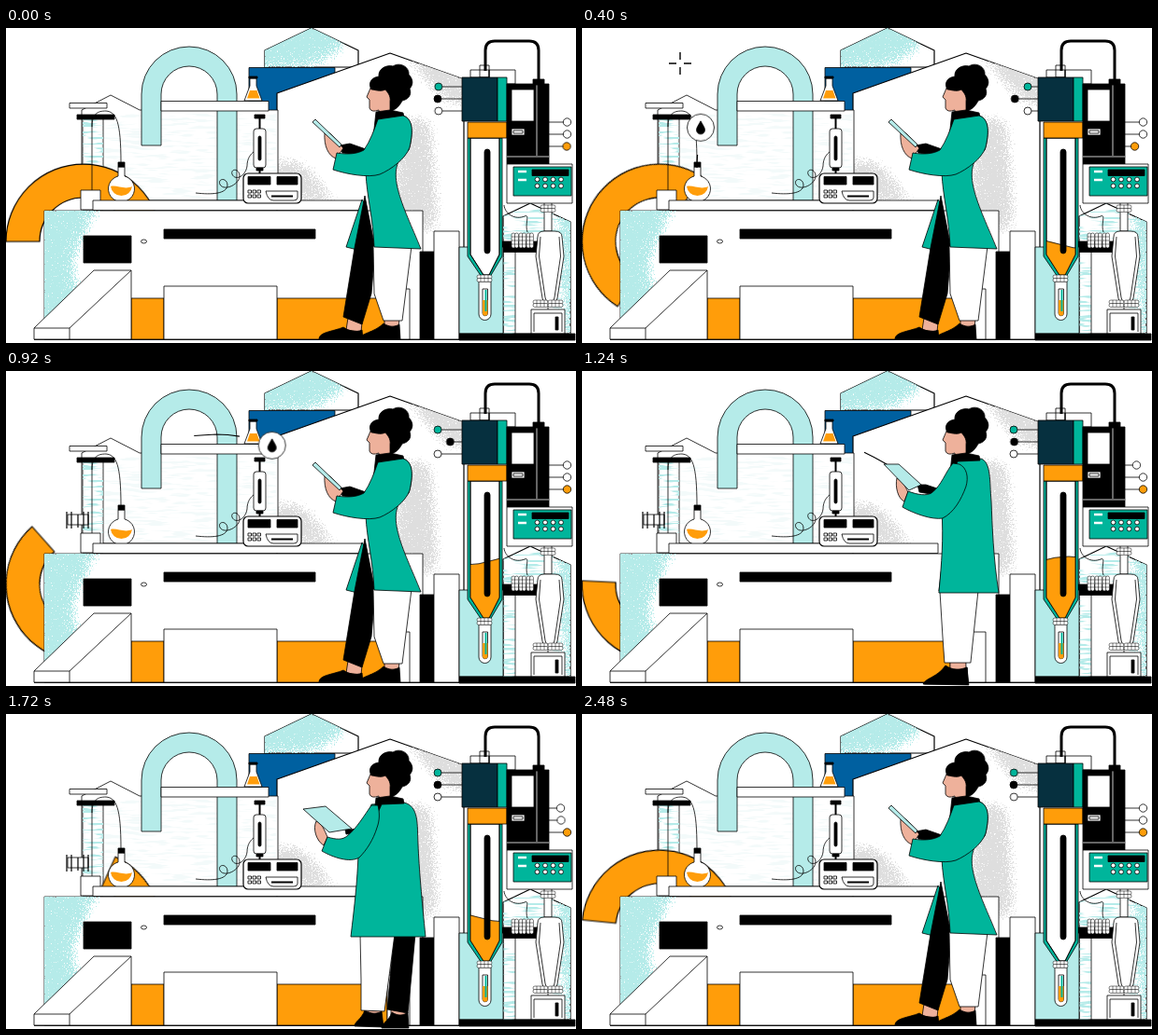
These frames come from a looping animation (610x338 px, 2520 ms). An HTML page without scripts:

```html
<!DOCTYPE html>
<html lang="en">
<head>
<meta charset="utf-8">
<title>Laboratory</title>
<style>
html, body { margin: 0; width: 100%; height: 100%; overflow: hidden; background: #fff; }
svg { display: block; }
#stage { fill: #fff; stroke: #000; stroke-width: .8; stroke-linejoin: round; }
.ink { fill: #000; }
.line { fill: none; }
.bold { stroke-width: 1.2; }
.fine { stroke-width: .5; }
.teal { fill: #00b59b; }
.pale { fill: #b5ebe9; }
.orange { fill: #ff9d0a; }
.blue { fill: #0060a0; }
.navy { fill: #06303f; }
.skin { fill: #eeb19b; }
.flat { stroke: none; }
.grain { filter: url(#grain); stroke: none; }
.hatch { filter: url(#hatch); stroke: none; }
.grey { fill: #dedede; }

.ring, .bubble, .trail, .spark, .level, .wave, .nudge, .pose { animation: 2520ms linear infinite; }

.ring { transform-origin: 83px 229px; animation-name: turn; }
@keyframes turn { to { transform: rotate(-360deg); } }

/* The droplet travels from the flask to the tablet, a short line follows. */
.bubble {
  offset-path: path('M123,150C123,128 127,118 127,106C127,76 180,70 225,68C262,68 300,82 345,112');
  offset-rotate: 0deg; animation-name: travel;
}
@keyframes travel {
  0%, 10.8% { offset-distance: 0%; transform: scale(0); }
  15% { transform: scale(1); }
  41% { transform: scale(1); }
  44.6%, 100% { offset-distance: 100%; transform: scale(0); }
}
.trail { fill: none; stroke-width: 1.2; stroke-dasharray: 17 200; animation-name: follow; }
@keyframes follow {
  0%, 10.7% { stroke-dashoffset: 27; }
  55.3%, 100% { stroke-dashoffset: -100; }
}
.spark { transform-origin: 105px 38px; animation-name: twinkle; }
@keyframes twinkle {
  0%, 11%, 21%, 100% { transform: scale(0); }
  15%, 17% { transform: scale(1); }
}

.level { animation-name: fill; }
@keyframes fill {
  0%, 100% { transform: translateY(274px); }
  6% { transform: translateY(256px); }
  15.9% { transform: translateY(232px); }
  26% { transform: translateY(213px); }
  36.5% { transform: translateY(203px); }
  43% { transform: translateY(201px); }
  49.2% { transform: translateY(204px); }
  68.3% { transform: translateY(218px); }
  84.1% { transform: translateY(248px); }
  95% { transform: translateY(270px); }
}
.wave { animation-name: drift; }
@keyframes drift { to { transform: translateX(-240px); } }

.nudge { animation-name: nudge; animation-timing-function: ease-in-out; }
@keyframes nudge {
  0%, 40%, 100% { transform: none; }
  20% { transform: translateX(var(--by)); }
}

/* Three poses: --a side, --c turning, --b back. */
.pose { d: var(--a); animation-name: pose; }
@keyframes pose {
  0%, 44.4% { d: var(--a); }
  49.2% { d: var(--c); }
  55.5%, 88.9% { d: var(--b); }
  93.6% { d: var(--c); }
  97.6%, 100% { d: var(--a); }
}
.leg-dark {
  --a: path('M384,180L395,236L391,285L381,318L361,310L373,236Z');
  --c: path('M395,230L420,238L415,280L412,312L394,312L390,238Z');
  --b: path('M414,230L438,236L434,280L430,321L408,317L415,238Z');
}
.leg-light {
  --a: path('M393,234L434,234L424,314L404,314L394,285Z');
  --c: path('M383,236L424,236L416,313L388,313L386,285Z');
  --b: path('M379,236L416,236L405,319L380,318L380,285Z');
}
.ankle-dark {
  --a: path('M366,311L381,316L380,326L364,324Z');
  --c: path('M394,310L410,310L410,320L394,320Z');
  --b: path('M412,316L429,319L429,326L412,325Z');
}
.ankle-light {
  --a: path('M405,312L421,312L420,322L405,322Z');
  --c: path('M394,311L411,311L411,321L394,321Z');
  --b: path('M383,316L402,317L401,323L384,322Z');
}
.shoe-dark {
  --a: path('M335,334C335,326 349,326 361,321C367,325 374,327 381,324L382,334Z');
  --c: path('M366,336C368,330 380,330 390,317C396,321 404,321 412,318L413,336Z');
  --b: path('M402,337C402,331 409,331 413,320C419,324 425,324 430,320L431,337Z');
}
.shoe-light {
  --a: path('M377,334C380,327 394,327 404,317C410,321 416,321 421,318L422,334Z');
  --c: path('M365,336C368,329 380,329 389,316C396,321 404,321 412,318L414,337Z');
  --b: path('M373,335C373,330 380,328 384,318C391,322 397,322 402,319L404,336Z');
}
.panel {
  --a: path('M381,184L364,235L376,238L385,190Z');
  --c: path('M388,184L382,236L392,238L395,190Z');
  --b: path('M384,184L372,236L384,238L390,190Z');
}
.coat {
  --a: path('M398,98L425,94C437,98 435,118 431,131C402,150 425,190 444,237L394,235C393,205 386,180 385,155Z');
  --c: path('M397,97L427,94C438,98 436,118 438,140C439,165 440,200 446,238L382,238C385,205 387,180 385,150Z');
  --b: path('M391,97L426,95C442,99 440,118 441,140C442,165 445,200 449,239L369,239C373,205 376,180 377,150Z');
}
.sleeve {
  --a: path('M398,98L425,94C437,98 435,114 432,128C428,140 412,152 400,157C388,161 365,157 350,152L354,134C366,136 376,135 383,131C390,121 394,109 398,98Z');
  --c: path('M397,99L404,100C412,104 414,114 411,124C406,138 398,152 386,158C375,160 355,153 343,146L349,129C360,133 368,134 374,131C385,123 389,108 397,99Z');
  --b: path('M391,98L398,98C400,106 400,114 397,122C393,135 386,146 378,154C368,160 350,154 338,147L344,132C354,135 360,135 365,131C375,123 384,108 391,98Z');
}
.far-arm {
  --a: path('M357,126L368,124L388,131L380,137L360,134Z');
  --c: path('M359,122L368,122L386,128L378,133L361,130Z');
  --b: path('M363,124L368,124L377,123L372,128L364,129Z');
}
.hand {
  --a: path('M341,112C347,109 354,122 361,129L353,140C345,137 340,127 341,112Z');
  --c: path('M337,115C343,118 346,124 349,130L345,140C338,137 335,124 337,115Z');
  --b: path('M332,115C338,117 341,125 344,132L340,141C332,136 328,123 332,115Z');
}
.tablet {
  --a: path('M328,101L331,98L359,125L357,128Z');
  --c: path('M323,100L339,100L363,122L350,128Z');
  --b: path('M318,102L342,99L370,123L346,127Z');
}
</style>
</head>
<body>
<svg id="stage" width="610" height="338" viewBox="0 0 610 338">
<defs>
  <filter id="grain" x="0" y="0" width="1" height="1" color-interpolation-filters="sRGB">
    <feTurbulence type="fractalNoise" baseFrequency=".7" numOctaves="2" seed="4" result="noise"/>
    <feGaussianBlur in="SourceAlpha" stdDeviation="12"/>
    <feComposite in2="noise" operator="arithmetic" k2="1" k3="1" k4="-1.2"/>
    <feComponentTransfer result="dots"><feFuncA type="linear" slope="9"/></feComponentTransfer>
    <feComposite in="SourceGraphic" in2="dots" operator="in"/>
  </filter>
  <filter id="hatch" x="0" y="0" width="1" height="1" color-interpolation-filters="sRGB">
    <feTurbulence type="fractalNoise" baseFrequency=".04 .35" numOctaves="2" seed="9" result="noise"/>
    <feComposite in="SourceAlpha" in2="noise" operator="arithmetic" k2="1" k3="1" k4="-1.52"/>
    <feComponentTransfer result="strokes"><feFuncA type="linear" slope="9"/></feComponentTransfer>
    <feComposite in="SourceGraphic" in2="strokes" operator="in"/>
  </filter>
  <path id="attic" d="M277,42V24L327,0L377,24V42Z"/>
  <path id="hall" d="M290,334V70L411,27L490,55V334Z"/>
  <path id="annex" d="M532,328V202L561,188L604,208V328Z"/>
  <path id="tank" d="M497,118V243L511,265H517L528,243V118Z"/>
  <clipPath id="in-attic"><use href="#attic"/></clipPath>
  <clipPath id="in-hall"><use href="#hall"/></clipPath>
  <clipPath id="in-annex"><use href="#annex"/></clipPath>
  <clipPath id="in-tank"><use href="#tank"/></clipPath>
  <g id="nut" class="fine">
    <rect width="16" height="4" rx="2"/><rect y="3.500" width="16" height="4" rx="2"/>
    <path class="line" d="M4,0V7M8,0V7M12,0V7"/>
  </g>
  <g id="key-row"><circle r="2.400"/><circle cx="8.500" r="2.400"/><circle cx="17" r="2.400"/><circle cx="25.500" r="2.400"/></g>
  <g id="buttons"><rect width="3.500" height="3"/><rect x="5" width="3.500" height="3"/><rect x="10" width="3.500" height="3"/></g>
</defs>

<!-- buildings -->
<use href="#attic" class="bold"/>
<g clip-path="url(#in-attic)">
  <path class="grain pale" d="M245,-25H375L368,28L325,50H245Z"/>
</g>
<rect class="blue" x="260" y="42.500" width="92" height="47"/>
<use href="#hall" class="bold"/>
<g clip-path="url(#in-hall)">
  <path class="grain grey" d="M405,12L510,30V95L465,85Z"/>
  <path class="grain grey" d="M415,90H462L470,225H405Z"/>
  <path class="grain grey" d="M272,135H318L372,195H272Z"/>
</g>
<path d="M81,185V88L112,72L143,88H291V185Z"/>
<rect class="hatch" x="105" y="92" width="184" height="92" fill="#f3fafa"/>
<path class="pale" d="M145,126V71A51,51 0 0 1 247,71V185H226V71A30,30 0 0 0 166,71V126Z"/>
<path d="M166,78.500H281V89H166Z"/>
<path d="M261,54H268V62L274,78H255L261,62Z"/>
<path class="orange flat" d="M261,67H268.500L271.500,75.500H258Z"/>
<rect class="ink" x="260" y="52" width="9" height="2"/>

<!-- stand, valve and turning ring -->
<path d="M68,80.500H108V86H68Z"/>
<rect x="82" y="97" width="22" height="98"/>
<rect class="hatch pale" x="82" y="98" width="22" height="76"/>
<rect class="ink" x="76" y="93" width="40" height="5"/>
<path d="M66,154H88V165H66Z"/>
<path class="line bold" d="M65,151V169M70,151V169M77,154V168M83,151V169M88,151V169"/>
<path class="ring orange bold" d="M0,229A83,83 0 0 1 166,229H130A47,47 0 0 0 36,229Z"/>
<path class="line" d="M92,98V175M92,106C92,92 98,89 107,89C118,90 123,100 123,145"/>
<rect x="80" y="174" width="21" height="21"/>
<path d="M120,149H127V159A14,14 0 1 1 120,159Z"/>
<path class="orange flat" d="M112,170C118,168 127,174 135,170A11.600,11.600 0 0 1 112,170Z"/>
<rect class="ink" x="120" y="144" width="7" height="5"/>

<!-- bench -->
<path class="line" d="M203,177C220,179 236,178 237,169C237,160 226,161 229,168C234,176 251,167 250,158C249,150 240,151 242,157C246,165 257,158 258,148C258,140 262,135 265,133"/>
<path class="line" stroke-width="2" d="M271.500,95V156"/>
<rect class="ink" x="266" y="93" width="11" height="4"/>
<rect x="265" y="108" width="13" height="42" rx="3"/>
<rect class="ink" x="270" y="116" width="3" height="26" rx="1.500"/>
<rect class="ink" x="268" y="150" width="7" height="3"/>
<rect x="41" y="196" width="405" height="138"/>
<svg x="41" y="196" width="170" height="138">
  <path class="grain pale" d="M-30,-30H76L36,58L64,165H-30Z"/>
</svg>
<rect x="93" y="185" width="288" height="10.500"/>
<rect class="bold" x="254" y="156" width="62" height="32" rx="5"/>
<path class="ink" d="M259,159.500H283V168H259ZM290,159.500H312V168H290Z"/>
<use href="#buttons" x="259" y="174"/>
<use href="#buttons" x="259" y="179"/>
<path d="M278,175H312V182Q312,185 308,185H286Q280,185 278,175Z"/>
<path class="line" stroke-width="2" d="M284,180.500H307"/>
<path class="ink" d="M83,223H134V252H83ZM169,216H331V226H169Z"/>
<ellipse cx="147.500" cy="229" rx="3" ry="2"/>
<path class="orange" d="M134,290H169V334H134ZM290,290H408V334H290Z"/>
<path d="M169,277H290V334H169ZM408,280H432V334H408Z"/>
<path d="M30,322L94,260H134V334H30Z"/>
<path class="line" d="M30,322H68L134,260M68,322V334M30,334.500H490"/>
<rect class="ink" x="443" y="240" width="15" height="94"/>
<rect x="458" y="218" width="27" height="116"/>

<!-- annex -->
<use href="#annex" class="bold"/>
<g clip-path="url(#in-annex)">
  <rect class="hatch pale" x="532" y="188" width="72" height="140"/>
  <path class="grain pale" d="M582,180H625V345H594Z"/>
</g>
<rect x="545" y="236" width="35" height="92"/>
<rect class="ink" x="530" y="229" width="50" height="11.500"/>
<path class="line" d="M533,190C534,200 545,206 555,202C561,199 555,211 558,219"/>
<g transform="translate(541 236) rotate(-90)"><use href="#nut"/><use href="#nut" y="8"/><use href="#nut" y="16"/></g>
<path d="M576,181H584V218H576Z"/>
<use href="#nut" x="572" y="190"/>
<path d="M569,224Q569,218 576,218H587Q595,218 595,224L597,245L590,290Q588,298 582,298Q576,298 574,290L567,245Z"/>
<path class="line" d="M572,224L570.500,245L577,289Q578,294 582,294Q586,294 587,289L593.500,245L592,224"/>
<rect x="562" y="302" width="36" height="26"/>
<path class="line" d="M565,326V306H595V326"/>
<rect class="ink" x="588" y="310" width="3" height="14"/>
<g transform="translate(564 292)"><use href="#nut"/><use href="#nut" x="16"/></g>

<!-- tank -->
<rect class="pale" x="485" y="235" width="47" height="93"/>
<path class="teal" d="M494,118V245L509,267H518L531,245V118Z"/>
<use href="#tank"/>
<g clip-path="url(#in-tank)">
  <g class="level">
    <path class="wave orange" d="M489,0q30,-10 60,0t60,0t60,0t60,0t60,0V90H489Z"/>
  </g>
</g>
<use href="#tank" style="fill:none"/>
<rect class="ink" x="512" y="130" width="6" height="112" rx="3"/>
<rect class="orange" x="494" y="101" width="42" height="17"/>
<path d="M506,272H519V307A6.500,6.500 0 0 1 506,307Z"/>
<path d="M510,280H515.500V306A2.700,2.700 0 0 1 510,306Z"/>
<path class="orange flat" d="M510,292H515.500V306A2.700,2.700 0 0 1 510,306Z"/>
<path class="line" style="stroke:#00b59b" stroke-width="2" d="M513.500,281V304"/>
<use href="#nut" x="504" y="265"/>
<rect class="ink" x="485" y="328" width="124" height="7"/>

<!-- controls -->
<g class="nudge" style="--by:15px;animation-delay:-80ms">
  <path d="M462,63H500M462,89H500"/>
  <circle class="teal" cx="462" cy="63" r="4"/><circle cx="462" cy="89" r="4"/>
</g>
<g class="nudge" style="--by:15px;animation-delay:-2220ms">
  <path d="M462,76H500"/><circle class="ink" cx="462" cy="76" r="4"/>
</g>
<g class="nudge" style="--by:-13px;animation-delay:-1544ms">
  <path d="M565,101H600"/><circle cx="600.500" cy="101" r="4.200"/>
</g>
<g class="nudge" style="--by:-9px;animation-delay:-1120ms">
  <path d="M565,114H600"/><circle cx="600.500" cy="114" r="4.200"/>
</g>
<g class="nudge" style="--by:-9px;animation-delay:-80ms">
  <path d="M565,127H600"/><circle class="orange" cx="600.500" cy="127" r="4.200"/>
</g>
<path d="M497,45H517V53H497ZM507,40H517V53H507ZM517,45H545V60H517Z"/>
<path class="line" stroke-width="3" d="M513,46V24Q513,14 523,14H560Q570,14 570,24V60"/>
<rect class="navy" x="488" y="53" width="38" height="47"/>
<rect class="teal" x="526" y="53" width="10" height="47"/>
<rect class="ink" x="536" y="60" width="45" height="86"/>
<rect x="541" y="66" width="24" height="34"/>
<path d="M541,108H555V115H541ZM543,110H553V113H543Z"/>
<path class="line" stroke="#fff" d="M568,60V137M536,138H581"/>
<path class="ink" d="M564,55H576V61H564Z"/>
<rect x="536" y="146" width="70" height="42"/>
<rect class="teal" x="543" y="149" width="62" height="31"/>
<rect class="ink" x="563" y="152" width="39" height="6.500"/>
<use href="#key-row" x="568.500" y="162.500"/>
<use href="#key-row" x="568.500" y="169.500"/>
<path class="line" stroke="#fff" stroke-width="2.500" d="M548,154H557M548,163H557"/>

<!-- droplet -->
<path class="line spark" stroke-width="1.400" d="M105,26V34M105,42V50M93,38H101M109,38H117"/>
<path class="trail" pathLength="100" d="M123,150C123,128 127,118 127,106C127,76 180,70 225,68C262,68 300,82 345,112"/>
<g class="bubble">
  <circle r="14.500"/>
  <path class="ink" d="M0,-7C2,-3 4.500,0 4.500,2.500A4.500,4.500 0 0 1 -4.500,2.500C-4.500,0 -2,-3 0,-7Z"/>
</g>

<!-- scientist -->
<path class="pose panel teal"/>
<path class="pose ankle-dark skin"/>
<path class="pose shoe-dark ink"/>
<path class="pose leg-dark ink"/>
<path class="pose ankle-light skin"/>
<path class="pose shoe-light ink"/>
<path class="pose leg-light"/>
<path class="pose far-arm ink"/>
<path class="pose coat teal"/>
<path class="skin" d="M392,60L386,74L389,77V86Q391,91 399,88V96H413V66Z"/>
<path class="ink" d="M396,90L411,88L425,91L426,96L402,97L393,117Z"/>
<path class="pose hand skin"/>
<path class="pose sleeve teal"/>
<path class="pose tablet pale"/>
<path class="ink" d="M391,66C387,59 391,53 399,52C398,44 407,39 414,41C422,36 432,42 431,50C437,56 435,62 432,65C435,73 429,77 424,78C421,84 417,88 411,89V79C412,72 408,69 406,66C400,69 395,66 391,66Z"/>
</svg>
</body>
</html>
```
